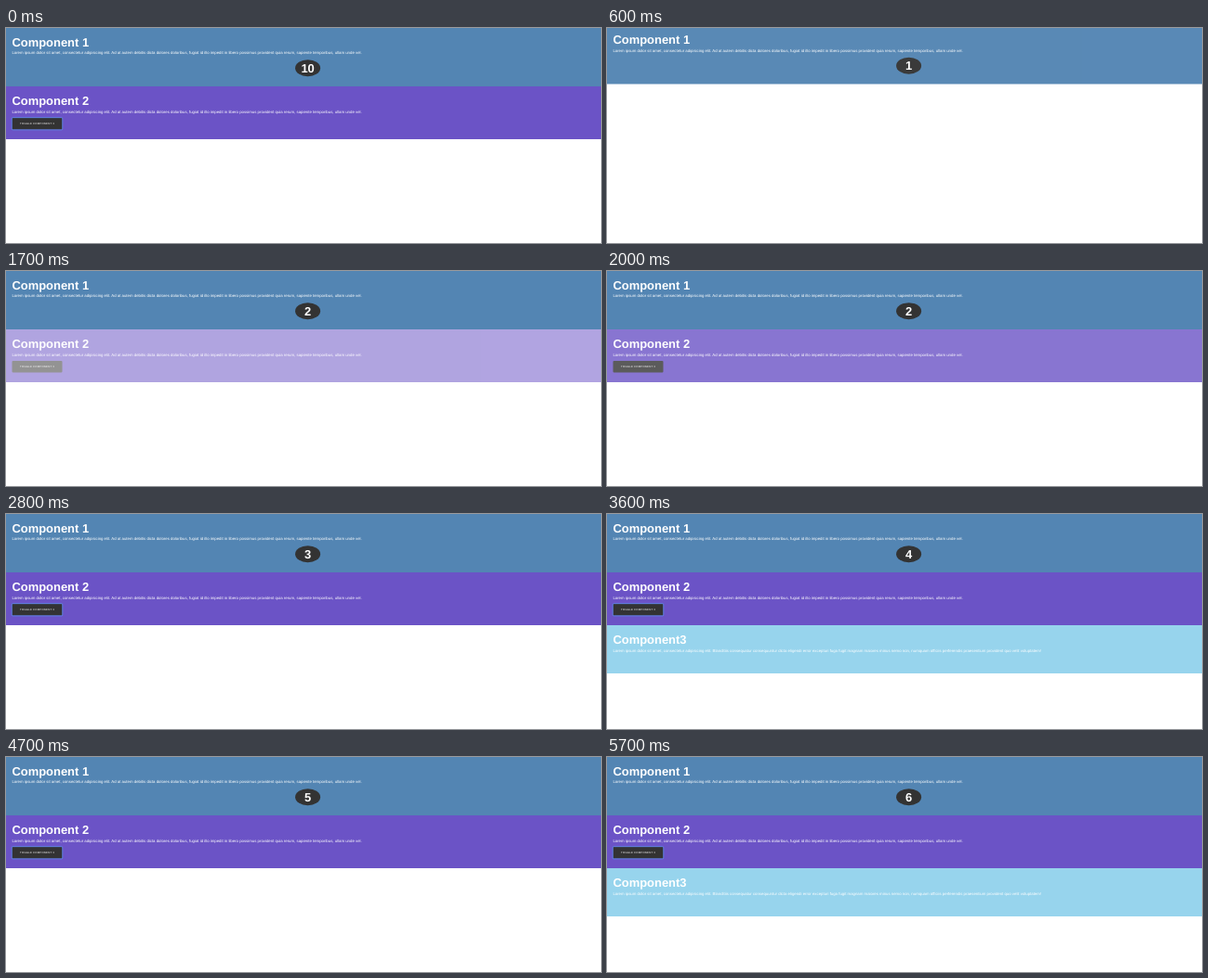
An HTML page for the animation above (5.8 s loop, 640 px wide and 232 px high).

```html
<!DOCTYPE html>
<html lang="en">
<head>
<meta charset="utf-8">
<title>Components</title>
<style>
  html, body { margin: 0; width: 100%; height: 100%; overflow: hidden; background: #fff; }
  svg { display: block; width: 640px; height: 232px; }
  text { font-family: "Liberation Sans", Arial, sans-serif; fill: #fff; text-rendering: geometricPrecision; }
  .title, #count { font-size: 12.96px; font-weight: 700; }
  .body { font-size: 4.32px; }
  .label { font-size: 2.8px; letter-spacing: .23px; }
  #count, .label { text-anchor: middle; }
</style>
</head>
<body>
<svg viewBox="0 0 640 232">
  <g id="one">
    <rect width="640" height="63" fill="#5385b3"/>
    <text class="title" x="6.4" y="20">Component 1</text>
    <text class="body" x="6.4" y="28.3">Lorem ipsum dolor sit amet, consectetur adipisicing elit. Ad at autem debitis dicta dolores doloribus, fugiat id illo impedit in libero possimus provident quia rerum, sapiente temporibus, ullam unde vel.</text>
    <ellipse cx="324.6" cy="43.2" rx="13.5" ry="9" fill="#333"/>
    <text id="count" x="324.6" y="47.8"></text>
  </g>
  <g id="two">
    <rect y="63" width="640" height="57" fill="#6b53c6"/>
    <text class="title" x="6.4" y="83">Component 2</text>
    <text class="body" x="6.4" y="91.5">Lorem ipsum dolor sit amet, consectetur adipisicing elit. Ad at autem debitis dicta dolores doloribus, fugiat id illo impedit in libero possimus provident quia rerum, sapiente temporibus, ullam unde vel.</text>
    <rect x="6.5" y="97" width="54" height="12.6" rx="1" fill="#333"/>
    <rect id="focus" x="6.2" y="96.7" width="54.6" height="13.2" rx="1" fill="none" stroke="#5b8fe8" stroke-width=".8"/>
    <text class="label" x="33.6" y="104.4">TOGGLE COMPONENT 3</text>
  </g>
  <g id="three">
    <rect y="120" width="640" height="52" fill="#97d4ed"/>
    <text class="title" x="6.4" y="140">Component3</text>
    <text class="body" x="6.4" y="148.8">Lorem ipsum dolor sit amet, consectetur adipisicing elit. Blanditiis consequatur consequuntur dicta eligendi error excepturi fuga fugit magnam maiores minus nemo non, numquam officiis perferendis praesentium provident quo velit voluptatem!</text>
  </g>
</svg>
<script>
  const LOOP = 5800, STEP = 100, RELOAD = 100, MOUNT = 400, CLICK = 2600;
  const [one, two, three, focusRing, count] =
    ["one", "two", "three", "focus", "count"].map(id => document.getElementById(id));

  const progress = (t, start, end) => Math.min(1, Math.max(0, (t - start) / (end - start)));
  const fade = (node, value) => node.setAttribute("opacity", value);

  function draw(t) {
    const before = t < RELOAD;
    const mounted = t >= MOUNT;
    const remaining = before ? 0 : (1 - progress(t, 350, 802)) ** 4;

    fade(one, before || mounted ? 1 - remaining : 0);
    one.setAttribute("transform", `translate(0 ${-63 * remaining})`);
    count.textContent = before ? 10 : 1 + Math.max(0, Math.floor((t - MOUNT) / 1000));

    fade(two, before ? 1 : progress(t, 1120, 2220));
    fade(focusRing, before || t >= CLICK ? 1 : 0);
    fade(three, progress(t, 2800, 3400) - progress(t, 3720, 4400) + progress(t, 5030, 5630));
  }

  const origin = performance.now();
  function tick() {
    const t = (performance.now() - origin) % LOOP;
    draw(Math.floor(t / STEP) * STEP);
    requestAnimationFrame(tick);
  }
  tick();
</script>
</body>
</html>
```
